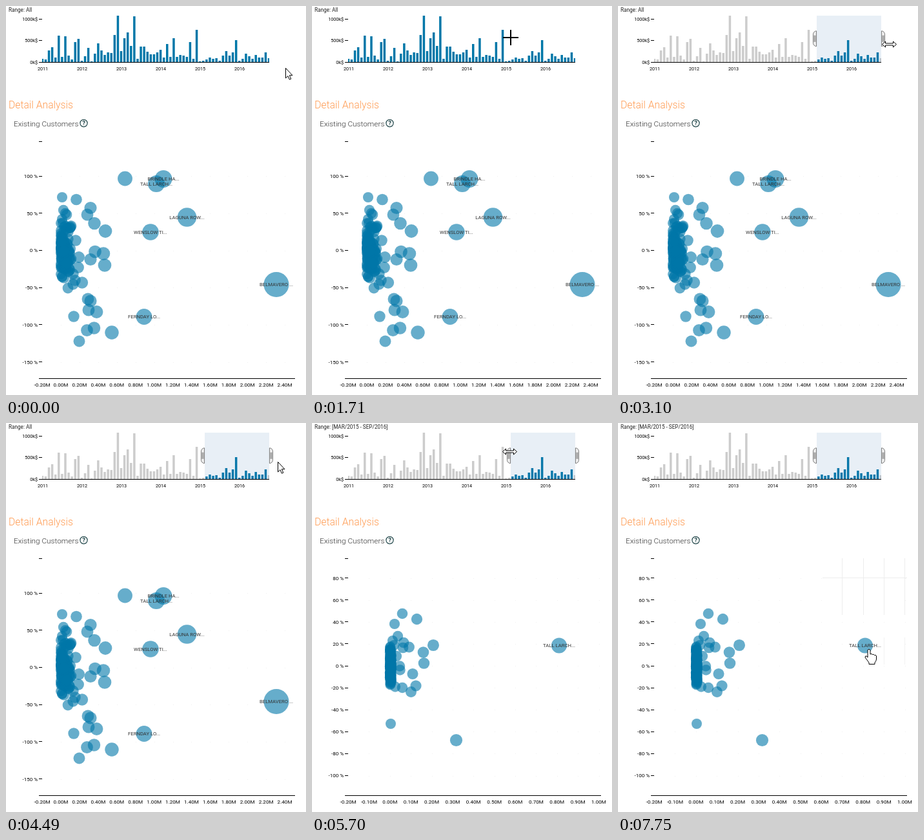
Recreate the animation shown at these times as an HTML page. Size 465 px wide and 604 px high, loop 8000 ms.

```html
<!DOCTYPE html>
<html lang="en">
<head>
<meta charset="utf-8">
<title>Detail Analysis</title>
<style>
  html, body { margin: 0; width: 100%; height: 100%; overflow: hidden; background: #fff; }
  svg { display: block; width: 465px; height: 604px; font-family: Roboto, sans-serif; }
</style>
</head>
<body>
<svg id="stage" viewBox="0 0 465 604"></svg>
<script>
const LOOP = 8000;
const BLUE = '#0077a8';
const BRUSH_START = 308;
const UPDATE_AT = 5430;
const HOVER_AT = 6830;

// Monthly bar heights, January 2011 onwards
const months = [
  5, 4, 18, 23, 7, 41, 8, 40, 10, 4, 31, 36,
  2, 9, 22, 1, 13, 29, 18, 11, 15, 14, 42, 72,
  17, 37, 46, 25, 71, 5, 24, 24, 16, 12, 12, 15,
  19, 7, 28, 8, 37, 8, 11, 10, 8, 31, 5, 50,
  1, 2, 4, 7, 5, 6, 2, 10, 17, 10, 15, 34,
  2, 5, 13, 9, 5, 11, 7, 7, 15, 6];

// Time, cursor, x, y, right edge of the brush (0 = no brush)
const steps = [
  [0, 'arrow', 433, 96, 0],
  [130, 'cross', 398, 84, 0],
  [250, 'cross', 368, 73, 0],
  [400, 'cross', 361, 71, 0],
  [830, 'cross', 354, 68, 0],
  [950, 'cross', 346, 65, 0],
  [1070, 'cross', 338, 62, 0],
  [1190, 'cross', 330, 58, 0],
  [1310, 'cross', 323, 55, 0],
  [1460, 'cross', 318, 53, 0],
  [1580, 'cross', 313, 51, 0],
  [1710, 'cross', 308, 49, 0],
  [1990, 'resize', 318, 52, 311],
  [2130, 'resize', 334, 54, 327],
  [2300, 'resize', 355, 56, 348],
  [2440, 'resize', 374, 57, 367],
  [2560, 'resize', 390, 58, 383],
  [2680, 'resize', 402, 59, 395],
  [2830, 'resize', 410, 59, 403],
  [2950, 'resize', 416, 59, 408],
  [3100, 'resize', 420.5, 59.5, 408],
  [3970, 'resize', 421, 53, 408],
  [4090, 'arrow', 421, 59, 408],
  [4490, 'arrow', 421, 60, 408],
  [4890, 'arrow', 395, 56, 408],
  [5020, 'arrow', 358, 52, 408],
  [5160, 'move', 330, 44, 408],
  [5280, 'resize', 306.5, 44.5, 408],
  [5430, 'resize', 306.5, 44.5, 408],
  [5560, 'resize', 306.5, 44.5, 408],
  [5700, 'resize', 306.5, 44.5, 408],
  [6010, 'resize', 305, 47, 408],
  [6130, 'resize', 309, 53, 408],
  [6260, 'move', 319, 61, 408],
  [6400, 'move', 323, 74, 408],
  [6550, 'move', 328.5, 80.5, 408],
  [6830, 'arrow', 400, 200, 408],
  [6960, 'arrow', 450, 333, 408],
  [7110, 'arrow', 432, 335, 408],
  [7230, 'arrow', 414, 338, 408],
  [7350, 'arrow', 400, 343, 408],
  [7480, 'hand', 392, 351, 408],
  [7620, 'hand', 390, 351, 408],
  [7750, 'hand', 389, 351, 408]];

const cursors = {
  arrow: 'M.5 .5V16L4 12.7L6.4 18.2L8.8 17.2L6.4 11.7H11Z',
  cross: 'M-12 0H12M0 -12V12',
  resize: 'M-11 0L-6 -4.5V-1.5H6V-4.5L11 0L6 4.5V1.5H-6V4.5Z',
  move: 'M0 -10.5L4 -6.5H1.5V-1.5H6.5V-4L10.5 0L6.5 4V1.5H1.5V6.5H4L0 10.5L-4 6.5H-1.5V1.5H-6.5V4L-10.5 0L-6.5 -4V-1.5H-1.5V-6.5H-4Z',
  hand: 'M-2 1.5Q0 -1 2 1.5V8Q4 6.5 5.5 8.5Q7.5 7.5 8.5 9.5Q11 8.5 11.5 11V16Q11 19 9 21V23.5H0V21L-6 13Q-6 10 -3.5 11L-2 13Z'
};

const ticks = (from, to, step) =>
  Array.from({ length: Math.round((to - from) / step) + 1 }, (_, i) => from + i * step);

// Scatter scales before and after filtering
const before = { x0: 85, kx: 144.6, y0: 379.5, ky: 1.154, xs: ticks(-0.2, 2.4, 0.2), ys: ticks(-150, 100, 50) };
const after = { x0: 120.8, kx: 323.7, y0: 377, ky: 1.705, xs: ticks(-0.2, 1, 0.1), ys: ticks(-100, 80, 20) };

const named = [
  ['BRINDLE HA...', 244, 268.5],
  ['TALL LARCH...', 233, 276],
  ['LAGUNA ROW...', 280.5, 328],
  ['WENSLOW TI...', 224, 351],
  ['BELMAVERO ...', 419, 432.5],
  ['FERNDAY LO...', 214, 482.5]];

const loose = [
  [184.5, 268], [87, 297], [109, 300.5], [131, 313.5], [126, 324], [137, 337.5], [154, 349.5],
  [151, 384.5], [138, 381.5], [153, 402.5], [131, 393.5], [113, 390], [112, 406], [118, 429.5],
  [127, 455], [131, 458], [128, 472], [140.5, 475], [105, 482], [125.5, 503.5], [136.5, 500],
  [164, 507], [113.5, 520.5], [96, 438], [104, 432], [107, 426], [108, 364], [89, 317],
  [92, 322], [94, 324], [95, 345], [100, 343], [87, 331], [88, 337], [104, 416], [87, 420]];

const filtered = [
  [140, 296], [162.5, 304.5], [128, 312], [133, 331], [142, 341], [150.5, 348], [141, 349],
  [125, 338], [188, 345], [172.5, 356], [173.5, 373], [156, 389.5], [161, 408], [153.5, 417.5],
  [140, 411], [129, 409.5], [136, 377.5], [136.5, 383.5], [131, 362], [122, 467], [223.5, 492.5],
  [127, 345]];

let seed = 7;
const random = () => (seed = seed * 16807 % 2147483647) / 2147483647;
const crowdBefore = () => [85 + random() ** 2 * 16, 379.5 + (random() + random() + random() - 1.5) * 36];
const crowdAfter = () => [120.8 + random() * 2, 377 + (random() + random() - 1) * 30];

const bubbles = [
  ...Array.from({ length: 110 }, () => ({ a: crowdBefore(), b: crowdAfter() })),
  ...loose.map((a, i) => ({ a, b: filtered[i] || crowdAfter() })),
  ...named.map(([label, x, y], i) => ({ label, a: [x, y], b: i === 1 ? [383, 345.5] : crowdAfter() }))];

const mix = (a, b, p) => a + (b - a) * p;
const ease = p => p < 0.5 ? 4 * p ** 3 : 1 - 4 * (1 - p) ** 3;
const radius = (scale, x) => 8 + 5 * (x - scale.x0) / scale.kx;

const text = (s, x, y, size, extra = '') => `<text x="${x}" y="${y}" font-size="${size}" ${extra}>${s}</text>`;
const rect = (x, y, w, h, fill, extra = '') =>
  `<rect x="${x}" y="${y}" width="${w}" height="${h}" fill="${fill}" ${extra}/>`;
const hline = (x1, x2, y, color = '#000') => rect(x1, Math.round(y - 0.5), x2 - x1, 1, color);
const vline = (x, y1, y2, color) => rect(Math.round(x - 0.5), y1, 1, y2 - y1, color);
const END = 'text-anchor="end"', MIDDLE = 'text-anchor="middle"';

function handle(x, side) {
  return `<path transform="translate(${x} 15) scale(${side * 0.85} .85)" fill="#eee" stroke="#666"
    d="M.5 28A6 6 0 0 1 6.5 34V50A6 6 0 0 1 .5 56ZM2.5 36V48M4.5 36V48"/>`;
}

function timeline(end) {
  const bars = months.map((h, i) => {
    const date = 57 + 5.09 * i;
    const active = !end || (date >= BRUSH_START && date < end);
    const left = Math.max(56, date - 2.4);
    return rect(left, 87 - h, Math.min(408, date + 1.1) - left, h, active ? BLUE : '#ccc');
  }).join('');
  const values = ['1000k$', '500k$', '0k$'].map((s, i) =>
    text(s, 49, 23 + 33.3 * i, 7.2, END) + hline(51, 56, 20.5 + 33.3 * i)).join('');
  const years = ticks(2011, 2016, 1).map((y, i) => text(y, 57 + 61 * i, 100, 7.2, MIDDLE)).join('');
  const brush = end && rect(BRUSH_START, 15, end - BRUSH_START, 72, 'steelblue', 'fill-opacity=".125"')
    + handle(BRUSH_START, -1) + handle(end, 1);
  return bars + hline(56, 408, 87.5) + values + years + (brush || '');
}

function axes(scale, p, opacity) {
  if (!opacity) return '';
  const place = (origin, k, v) => mix(before[origin] + before[k] * v, after[origin] + after[k] * v, p);
  const xs = scale.xs.map(v => [v, place('x0', 'kx', v)]).filter(([, x]) => x > 50 && x < 449);
  const ys = scale.ys.map(v => [v, mix(before.y0 - before.ky * v, after.y0 - after.ky * v, p)])
    .filter(([, y]) => y > 210 && y < 578);
  let out = '';
  for (const [v, x] of xs) {
    out += text(v.toFixed(2).replace('-0.00', '0.00') + 'M', x, 591, 8.1, MIDDLE);
    for (const [, y] of ys) out += rect(Math.round(x), Math.round(y), 1, 1, '#f0f0f0');
  }
  for (const [v, y] of ys) out += text(v + ' %', 49, y + 2.9, 8, END) + hline(51, 56, y);
  return `<g opacity="${opacity}">${out}</g>`;
}

function hoverGrid(t) {
  if (t < HOVER_AT) return '';
  let out = hline(317, 448, 240.5, '#ededed');
  for (const x of [347.5, 380, 412, 444.5]) out += vline(x, 210, 298, '#ededed');
  if (t >= 7110) out += vline(412, 333, 375, '#f2f2f2') + vline(444.5, 333, 375, '#f2f2f2');
  return out;
}

function scatter(t) {
  const p = ease(Math.min(1, Math.max(0, (t - 5330) / 370))) * (t >= UPDATE_AT);
  let circles = '', labels = '';
  for (const { a, b, label } of bubbles) {
    const x = mix(a[0], b[0], p), y = mix(a[1], b[1], p);
    const r = mix(radius(before, a[0]), radius(after, b[0]), p);
    circles += `<circle cx="${x}" cy="${y}" r="${r}"/>`;
    const opacity = b[0] > 300 ? 1 : 1 - p;
    if (label && opacity) labels += text(label, x, y + 2.8, 7.7, `${MIDDLE} fill="#333" opacity="${opacity}"`);
  }
  return axes(before, p, 1 - p) + axes(after, p, p) + hoverGrid(t)
    + hline(51, 56, 210.5) + hline(51, 448, 578.5)
    + `<g fill="${BLUE}" fill-opacity=".6">${circles}</g>` + labels;
}

function headings(t) {
  return text(t < UPDATE_AT ? 'Range: All' : 'Range: [MAR/2015 - SEP/2016]', 4, 9, 8.2, 'fill="#222"')
    + text('Detail Analysis', 4, 159, 15.7, 'fill="#ff9a50" font-weight="300"')
    + text('Existing Customers', 12, 187, 11.8, 'fill="#333" font-weight="300"')
    + '<circle cx="120.5" cy="182" r="5.6" fill="none" stroke="#1f4548" stroke-width="1.2"/>'
    + text('?', 120.5, 185.4, 9.5, `${MIDDLE} fill="#1f4548" font-weight="700"`);
}

function cursor(kind, x, y) {
  return `<path transform="translate(${x} ${y})" d="${cursors[kind]}" fill="#fff" stroke="#000"
    stroke-width="${kind === 'cross' ? 2 : 1}" stroke-linejoin="round"/>`;
}

const stage = document.getElementById('stage');
let shown;

function tick() {
  const now = performance.now() % LOOP;
  const step = steps.findLast(s => s[0] <= now);
  if (step !== shown) {
    const [t, kind, x, y, end] = shown = step;
    stage.innerHTML = headings(t) + timeline(end) + scatter(t) + cursor(kind, x, y);
  }
  requestAnimationFrame(tick);
}
tick();
</script>
</body>
</html>
```
